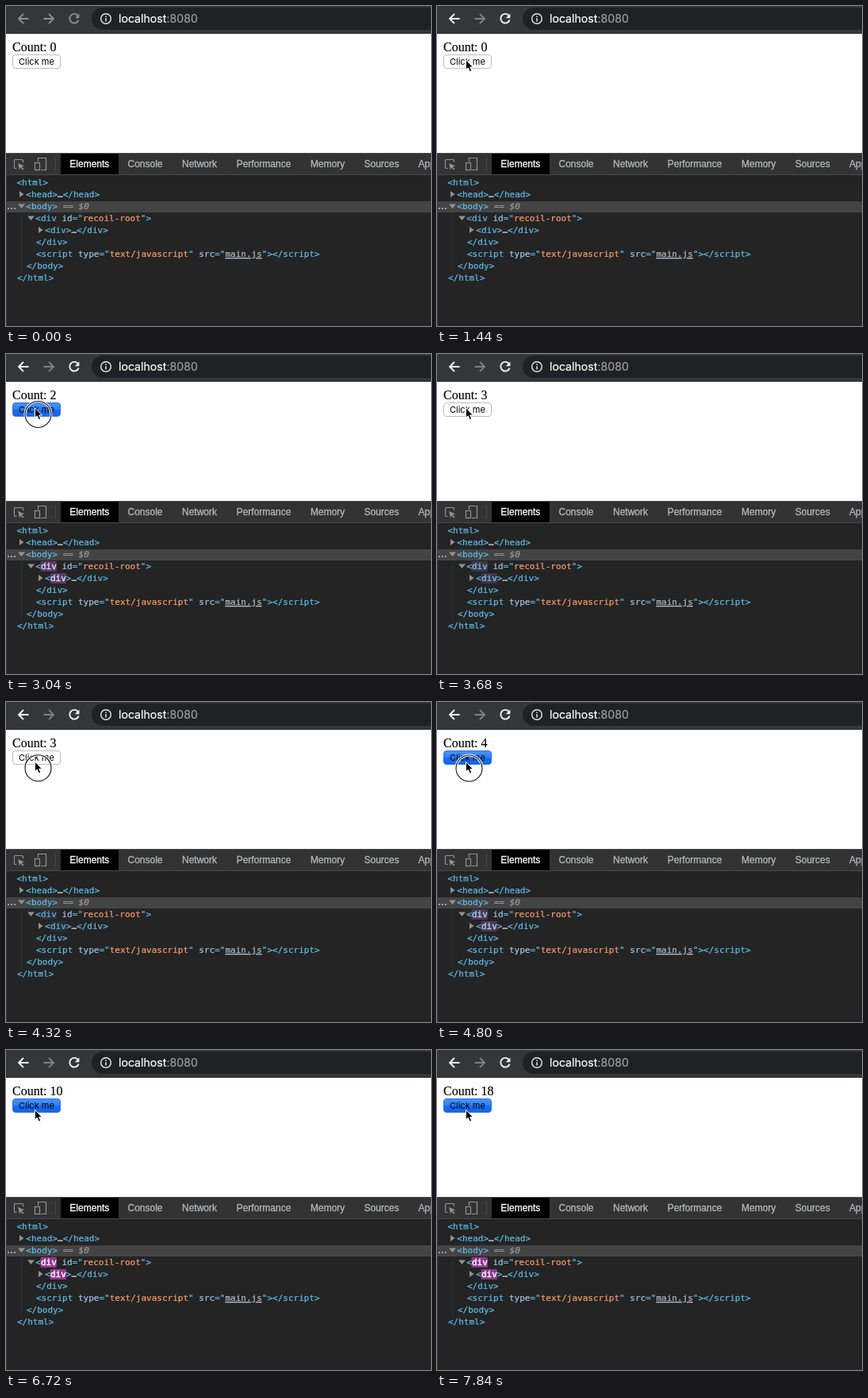
Recreate the animation shown at these times as an HTML page. Size 536 by 403 pixels, loop 8 s.

```html
<!DOCTYPE html>
<html lang="en">
<head>
<meta charset="utf-8">
<title>Click counter</title>
<style>
html, body { margin: 0; width: 100%; height: 100%; overflow: hidden; background: #242424; }
svg { display: block; width: 536px; height: 403px; }
text { white-space: pre; }
.ui { font-family: Inter, Roboto, sans-serif; }
.page { font: 16px "Liberation Serif", Times, serif; stroke: #000; stroke-width: .15; }
.tabs { font: 12px "Liberation Sans", Arial, sans-serif; fill: #b4b7ba; stroke: #b4b7ba; stroke-width: .3; }
.tabs .on { fill: #fff; stroke: #fff; }
.tree { font: 11px "DejaVu Sans Mono", monospace; fill: #61bdea; stroke: #61bdea; stroke-width: .2; }
.name { fill: #a3c5e8; stroke: #a3c5e8; }
.value { fill: #fb9d6c; stroke: #fb9d6c; }
.plain { fill: #e0e0e0; stroke: #e0e0e0; }
.link { fill: #b5bfc9; stroke: #b5bfc9; text-decoration: underline; }
.hint { fill: #989898; stroke: #989898; font-style: italic; }
.line { fill: none; stroke-width: 1.9; }
</style>
</head>
<body>
<svg viewBox="0 0 536 403">
  <defs>
    <linearGradient id="blue" x2="0" y2="1">
      <stop stop-color="#4a93f9"/><stop offset=".48" stop-color="#2f7ef5"/>
      <stop offset=".5" stop-color="#1a6cf0"/><stop offset="1" stop-color="#1564ea"/>
    </linearGradient>
  </defs>

  <!-- Browser toolbar -->
  <rect width="536" height="35" fill="#35363a"/>
  <rect y="34" width="536" height="1" fill="#2a2b2e"/>
  <rect x="108" y="2" width="460" height="28" rx="14" fill="#202124"/>
  <path id="back" class="line" d="M28.5 16H16.5M22 10L16 16L22 22"/>
  <path id="forward" class="line" d="M47.5 16H59.5M54 10L60 16L54 22"/>
  <g id="reload">
    <path class="line" d="M90.4 11.8A5.8 5.8 0 1 0 91.6 17.6"/>
    <path d="M92.4 9.6V15.2H86.8Z" stroke="none"/>
  </g>
  <circle cx="126" cy="16" r="6.3" fill="none" stroke="#e8eaed" stroke-width="1.4"/>
  <path d="M126 12.4V14M126 15.2V19.6" stroke="#e8eaed" stroke-width="1.5"/>
  <text class="ui" x="142" y="21" font-size="14.15" fill="#fff" stroke="#fff" stroke-width=".2">localhost<tspan fill="#9aa0a6" stroke="#9aa0a6">:8080</tspan></text>

  <!-- Page -->
  <rect y="35" width="536" height="150" fill="#fff"/>
  <text id="count" class="page" x="8" y="57"></text>
  <rect id="button" x="8.5" y="61.5" width="60" height="17" rx="3.5"/>
  <text class="ui" x="16" y="74" font-size="11">Click me</text>

  <!-- Developer tools -->
  <rect y="185" width="536" height="218" fill="#242424"/>
  <rect y="185" width="536" height="27" fill="#333"/>
  <path d="M0 185.5H536M0 212.5H536M62.5 191V207" stroke="#474a48"/>
  <rect x="69" y="186" width="73" height="26"/>
  <g fill="none" stroke="#919191" stroke-width="1.2">
    <path d="M13.5 204.5H11.5Q10.5 204.5 10.5 203.5V194.5Q10.5 193.5 11.5 193.5H20.5Q21.5 193.5 21.5 194.5V197"/>
    <path d="M15 198L23 201.3L19.6 202.4L22.6 205.5L21.4 206.6L18.4 203.6L17.2 206.5Z" fill="#919191" stroke="none"/>
    <path d="M40.5 196V191.5H50.5V206.5H44"/>
    <rect x="36.5" y="197.5" width="6" height="9"/>
  </g>
  <g id="tabs" class="tabs"></g>

  <rect y="246" width="536" height="14" fill="#444"/>
  <path d="M19.5 261V336" stroke="#1c3350"/>
  <path d="M.5 186V403" stroke="#3a3a3a"/>
  <path d="M2 254h2v2h-2zM6 254h2v2h-2zM10 254h2v2h-2z" fill="#a0a0a0"/>
  <path fill="#919191" d="M17 233V241L22.5 237ZM15 249.5H24L19.5 255ZM27 264.5H36L31.5 270ZM41 278V286L46.5 282Z"/>
  <g id="marks">
    <rect x="43.5" y="261" width="20.5" height="13" rx="1.5"/>
    <rect x="55.5" y="276" width="20.5" height="13" rx="1.5"/>
  </g>
  <g id="tree" class="tree"></g>

  <!-- Pointer -->
  <g id="pointer">
    <g id="ring" fill="none">
      <circle cx="4" cy="8" r="16.5" stroke="#fff" stroke-width="3"/>
      <circle cx="4" cy="8" r="16.5" stroke="#111" stroke-width="1.1"/>
    </g>
    <path d="M0 0V12.3L2.8 9.8L4.8 14.6L7.2 13.6L5.2 9H9Z" stroke="#fff"/>
  </g>
</svg>
<script>
const $ = id => document.getElementById(id);
const LOOP = 8000, STEP = 160, HOLD = 80, PAINT_LAG = 60, FADE = 1120;

const tabs = { Elements: 80.3, Console: 153.5, Network: 222, Performance: 290.7, Memory: 384, Sources: 451.7, Application: 520 };
$('tabs').innerHTML = Object.entries(tabs)
  .map(([label, x], i) => `<text x="${x}" y="203"${i ? '' : ' class="on"'}>${label}</text>`).join('');

const span = (kind, text) => `<tspan class="${kind}">${text}</tspan>`;
const attr = (name, value) => ` ${span('name', name)}="${value}"`;
const dots = span('plain', '…');
const live = span('live', 'div');
const rows = [
  [13.5, '&lt;html&gt;'],
  [25.3, `&lt;head&gt;${dots}&lt;/head&gt;`],
  [25.3, `&lt;body&gt;${span('hint', ' == $0')}`],
  [37.3, `&lt;${live}${attr('id', span('value', 'recoil-root'))}&gt;`],
  [49.3, `&lt;${live}&gt;${dots}&lt;/div&gt;`],
  [38, '&lt;/div&gt;'],
  [38, `&lt;script${attr('type', span('value', 'text/javascript'))}${attr('src', span('link', 'main.js'))}&gt;&lt;/script&gt;`],
  [26, '&lt;/body&gt;'],
  [14, '&lt;/html&gt;']
];
$('tree').innerHTML = rows.map(([x, row], i) => `<text x="${x}" y="${226 + 15 * i}">${row}</text>`).join('');
const liveTags = document.querySelectorAll('.live');

// Mouse-up times: single clicks first, then two bursts.
const clicks = [2490, 2780, 3060, 4390, 4960];
for (let i = 0; i < 5; i++) clicks.push(5820 + 220 * i);
for (let i = 1; i <= 8; i++) clicks.push(6700 + 137.5 * i);
const downAt = up => up - (up === 4960 ? 240 : HOLD);

const clamp = v => Math.min(1, Math.max(0, v));
const ease = v => v * v * (3 - 2 * v);
const lerp = (a, b, k) => a + (b - a) * k;
const mix = (a, b, k) => `rgb(${a.map((v, i) => Math.round(lerp(v, b[i], k)))})`;

// cubic-bezier(0, 0, .2, 1), solved by bisection
function decelerate(x) {
  let lo = 0, hi = 1;
  for (let i = 0; i < 20; i++) {
    const s = (lo + hi) / 2;
    if (.6 * (1 - s) * s * s + s ** 3 < x) lo = s; else hi = s;
  }
  return 3 * (1 - lo) * lo * lo + lo ** 3;
}

function tint(node, color) {
  node.setAttribute('stroke', color);
  node.setAttribute('fill', color);
}

function draw(time) {
  const t = Math.floor(time / STEP) * STEP;
  const done = clicks.filter(up => up <= t);
  $('count').textContent = `Count: ${done.length}`;

  const active = t >= 640;
  tint($('back'), active ? '#f1f3f4' : '#8c8d90');
  tint($('reload'), active ? '#f1f3f4' : '#8c8d90');
  tint($('forward'), active ? '#7e8083' : '#8c8d90');

  const pressed = clicks.some(up => t >= downAt(up) + PAINT_LAG && t < up + PAINT_LAG);
  $('button').setAttribute('fill', pressed ? 'url(#blue)' : '#fff');
  $('button').setAttribute('stroke', pressed ? '#2a72e8' : '#bdbdbd');

  const age = done.length ? t - done[done.length - 1] : Infinity;
  const faded = decelerate(clamp(age / FADE));
  $('marks').setAttribute('fill', mix([158, 54, 153], [46, 56, 66], faded));
  $('marks').setAttribute('opacity', age === Infinity ? 0 : 1 - clamp((age - FADE) / 280));
  liveTags.forEach(tag => {
    tag.style.fill = tag.style.stroke = mix([255, 255, 255], [97, 189, 234], faded ** 2);
    tag.style.strokeWidth = lerp(.5, .2, faded);
  });

  const enter = ease(clamp((t - 160) / 800));
  const drop = ease(clamp((t - 3760) / 640));
  const x = lerp(-4, 36.5, enter), y = lerp(130, 68, enter) + 7.5 * drop;
  $('pointer').setAttribute('transform', `translate(${x} ${y})`);
  $('pointer').style.display = t >= 320 ? '' : 'none';
  $('ring').style.display = clicks.some(up => t >= downAt(up) && t < up) ? '' : 'none';
}

const start = performance.now();
function tick() {
  draw((performance.now() - start) % LOOP);
  requestAnimationFrame(tick);
}
tick();
</script>
</body>
</html>
```
